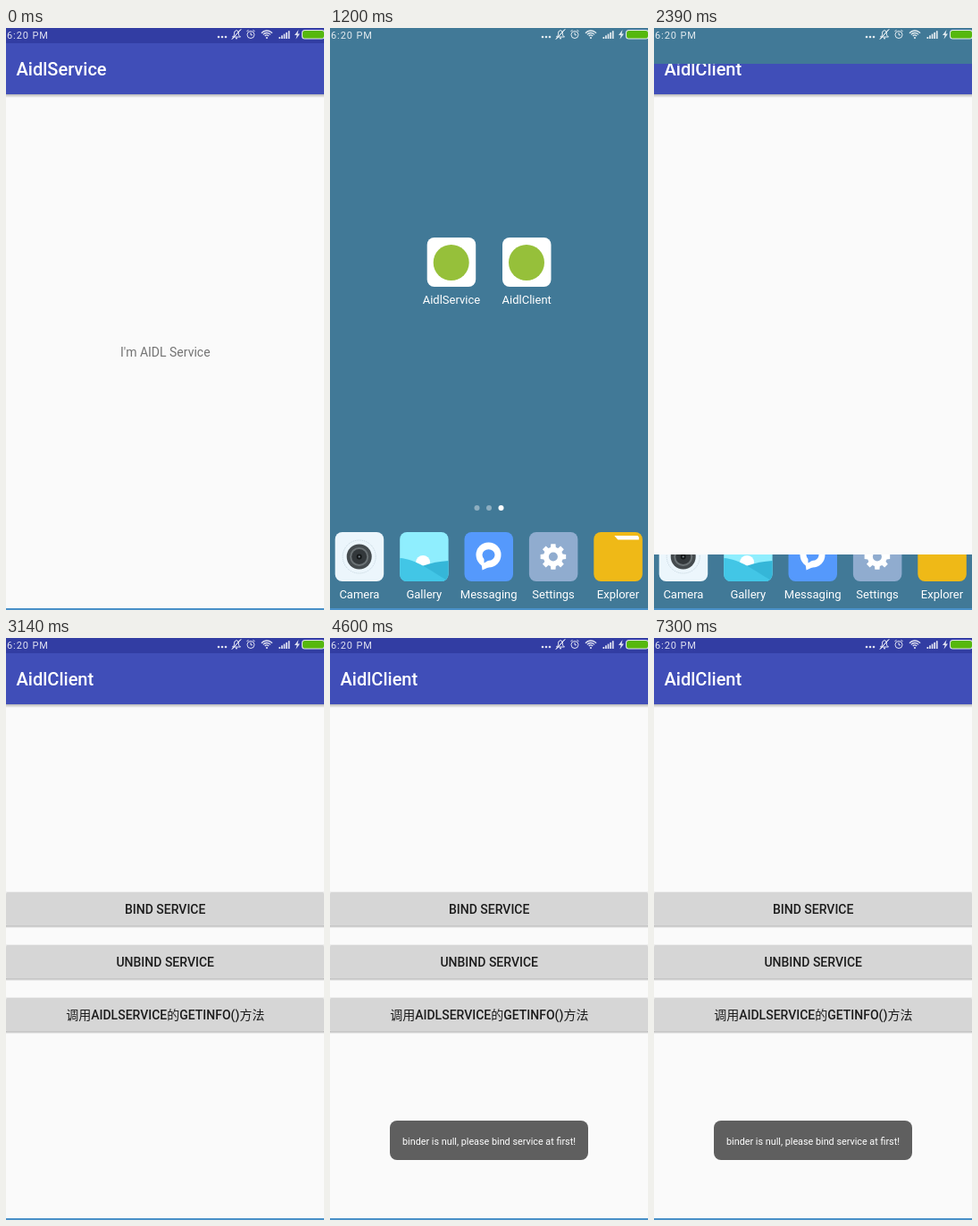
Animation, 356 px wide and 650 px high, one loop 8000 ms. Source, as an HTML page with a canvas:

```html
<!DOCTYPE html>
<html lang="en">
<head>
<meta charset="utf-8">
<title>AIDL demo</title>
<style>
html, body { margin: 0; width: 100%; height: 100%; overflow: hidden; background: #fafafa; }
canvas { display: block; width: 356px; height: 650px; }
</style>
</head>
<body>
<canvas id="stage" width="356" height="650"></canvas>
<script>
const W = 356, H = 650, LOOP = 8000;
const ctx = document.getElementById('stage').getContext('2d');
const COLOR = {
  wall: '#417997', statusBar: '#323da3', toolbar: '#404eb8',
  page: '#fafafa', button: '#d6d6d6', toast: '#5f5f5f', line: '#4990c8'
};

function rect(x, y, w, h, fill) {
  ctx.fillStyle = fill;
  ctx.fillRect(x, y, w, h);
}

function roundRect(x, y, w, h, r, fill) {
  ctx.fillStyle = fill;
  ctx.beginPath();
  ctx.roundRect(x, y, w, h, r);
  ctx.fill();
}

function circle(x, y, r, fill) {
  ctx.fillStyle = fill;
  ctx.beginPath();
  ctx.arc(x, y, r, 0, Math.PI * 2);
  ctx.fill();
}

function arc(x, y, r, from = 0, to = Math.PI * 2) {
  ctx.beginPath();
  ctx.arc(x, y, r, from, to);
  ctx.stroke();
}

function poly(points, fill) {
  ctx.beginPath();
  points.forEach(([x, y]) => ctx.lineTo(x, y));
  ctx.closePath();
  if (fill) {
    ctx.fillStyle = fill;
    ctx.fill();
  } else ctx.stroke();
}

function text(str, x, y, size, fill, { weight = 400, align = 'center', spacing = 0 } = {}) {
  ctx.font = `${weight} ${size}px Roboto, "Noto Sans CJK SC", sans-serif`;
  ctx.textAlign = align;
  ctx.letterSpacing = spacing + 'px';
  ctx.fillStyle = fill;
  ctx.fillText(str, x, y);
}

function fade(y, h, alpha) {
  const g = ctx.createLinearGradient(0, y, 0, y + h);
  g.addColorStop(0, `rgba(0,0,0,${alpha})`);
  g.addColorStop(1, 'rgba(0,0,0,0)');
  rect(0, y, W, h, g);
}

// Value of the latest [time, value] step reached.
function stepAt(steps, t) {
  let value = null;
  for (const [start, v] of steps) if (t >= start) value = v;
  return value;
}

function statusIcons() {
  const tint = 'rgba(255,255,255,0.85)';
  text('6:20 PM', 1, 11.5, 11, tint, { align: 'left', spacing: 0.9 });
  for (let i = 0; i < 3; i++) circle(238 + i * 4, 10, 1.3, tint);

  ctx.strokeStyle = tint;
  ctx.lineWidth = 1;
  poly([[253.5, 10], [255.5, 8], [255.8, 4], [258, 2.5], [260.2, 4], [260.5, 8], [262.5, 10]]);
  poly([[253, 12.5], [263, 1.5]]);
  circle(258, 11.5, 1, tint);

  arc(274, 7.5, 4);
  ctx.beginPath();
  ctx.moveTo(274, 5);
  ctx.lineTo(274, 7.8);
  ctx.lineTo(276, 7.8);
  ctx.moveTo(269.5, 4);
  ctx.lineTo(271.5, 2);
  ctx.moveTo(276.5, 2);
  ctx.lineTo(278.5, 4);
  ctx.stroke();

  ctx.lineWidth = 1.3;
  for (const r of [3, 5.5, 8]) arc(292, 11, r, -Math.PI * 0.77, -Math.PI * 0.23);
  circle(292, 11, 1.1, tint);

  for (let i = 0; i < 5; i++) rect(305.5 + i * 2.6, 10 - i * 1.7, 1.7, 2 + i * 1.7, tint);
  poly([[327.5, 2], [323, 8], [325.7, 8], [324.5, 12.5], [329, 6.5], [326.5, 6.5]], tint);

  roundRect(331, 2, 26, 10.5, 3.5, tint);
  roundRect(332, 3, 24, 8.5, 2.8, '#56b80d');
}

function tile(x, y, fill) {
  roundRect(x, y, 54.5, 55, 8, fill);
}

function appIcon(x, name, dimmed) {
  tile(x, 234, '#fff');
  circle(x + 27, 262, 20, '#96c03a');
  if (dimmed) tile(x, 234, 'rgba(0,0,0,0.45)');
  text(name, x + 27.2, 308, 13, '#fff');
}

function cameraIcon(x) {
  tile(x, 563, '#ecf6fc');
  ctx.strokeStyle = '#b9cbd5';
  ctx.lineWidth = 0.8;
  ctx.setLineDash([1, 1]);
  arc(x + 27, 590.5, 18.5);
  ctx.setLineDash([]);
  circle(x + 27, 590.5, 14, '#454b4e');
  circle(x + 27, 590.5, 10.5, '#6b7275');
  circle(x + 27, 590.5, 8.5, '#33383b');
  circle(x + 27, 590.5, 3, '#151819');
  circle(x + 27, 590.5, 1, '#849097');
}

function galleryIcon(x) {
  ctx.save();
  ctx.beginPath();
  ctx.roundRect(x, 563, 54.5, 55, 8);
  ctx.clip();
  rect(x, 563, 55, 55, '#8feefe');
  circle(x + 26, 597, 8, '#fff');
  const wave = (from, c1, c2, to, fill) => {
    ctx.fillStyle = fill;
    ctx.beginPath();
    ctx.moveTo(x, 618);
    ctx.lineTo(x, from);
    ctx.bezierCurveTo(x + 18, c1, x + 34, c2, x + 55, to);
    ctx.lineTo(x + 55, 618);
    ctx.fill();
  };
  wave(612, 603, 596, 595, '#35b6d8');
  wave(592, 593, 606, 618, '#42c6e6');
  ctx.restore();
}

function messagingIcon(x) {
  tile(x, 563, '#5599fc');
  circle(x + 27, 588.5, 14, '#fff');
  poly([[x + 19, 598], [x + 20, 605.5], [x + 32, 600]], '#fff');
  ctx.fillStyle = '#5599fc';
  ctx.beginPath();
  ctx.ellipse(x + 27, 588.5, 7, 6.3, 0, 0, Math.PI * 2);
  ctx.fill();
  poly([[x + 22, 592], [x + 22, 597.5], [x + 28, 594]], '#5599fc');
}

function settingsIcon(x) {
  tile(x, 563, '#90accf');
  const points = [];
  for (let i = 0; i < 8; i++) {
    for (const [shift, r] of [[-0.27, 11], [-0.18, 14.5], [0.18, 14.5], [0.27, 11]]) {
      const a = i * Math.PI / 4 + shift;
      points.push([x + 27 + r * Math.cos(a), 590.5 + r * Math.sin(a)]);
    }
  }
  poly(points, '#fff');
  circle(x + 27, 590.5, 5, '#90accf');
}

function explorerIcon(x) {
  tile(x, 563, '#efb917');
  poly([[x + 23, 567], [x + 49, 567], [x + 50.5, 568.5], [x + 50.5, 571.5], [x + 27, 571.5]], '#fff');
}

const DOCK = [
  ['Camera', cameraIcon], ['Gallery', galleryIcon], ['Messaging', messagingIcon],
  ['Settings', settingsIcon], ['Explorer', explorerIcon]
];

function home(pressed) {
  rect(0, 0, W, H, COLOR.wall);
  appIcon(108.7, 'AidlService', false);
  appIcon(193, 'AidlClient', pressed);
  [0.4, 0.4, 1].forEach((a, i) => circle(164.5 + i * 13.5, 536, 3, `rgba(255,255,255,${a})`));
  DOCK.forEach(([name, icon], i) => {
    const x = 5.7 + i * 72.4;
    icon(x);
    text(name, x + 27.2, 637, 13, '#fff');
  });
}

function page(title, barTop = 0, shift = 0) {
  rect(0, barTop, W, H - barTop, COLOR.page);
  rect(0, barTop, W, 17 + shift - barTop, COLOR.statusBar);
  rect(0, 17 + shift, W, 57, COLOR.toolbar);
  fade(74 + shift, 4, 0.27);
  text(title, 11.5, 53 + shift, 20, '#fff', { weight: 500, align: 'left' });
}

function servicePage(barTop, shift) {
  page('AidlService', barTop, shift);
  text("I'm AIDL Service", 178.3, 367 + shift, 14, '#737373');
}

function button(y, pressed) {
  fade(y + 37, pressed ? 7 : 3, pressed ? 0.4 : 0.32);
  rect(0, y - 0.5, W, 1, '#e4e4e4');
  roundRect(0, y, W, 37.5, 1.5, COLOR.button);
}

function mixedLabel(parts, center, y) {
  const weightOf = s => /[A-Z]/.test(s) ? 500 : 300;
  const widths = parts.map(s => {
    ctx.letterSpacing = '0px';
    ctx.font = `${weightOf(s)} 14px Roboto, "Noto Sans CJK SC", sans-serif`;
    return ctx.measureText(s).width;
  });
  let x = center - widths.reduce((a, b) => a + b) / 2;
  parts.forEach((s, i) => {
    text(s, x, y, 14, '#1c1c1c', { weight: weightOf(s), align: 'left' });
    x += widths[i];
  });
}

function clientPage(t) {
  page('AidlClient');
  if (t < 2690) return;
  button(284, false);
  button(343, t >= 4020 && t < 4170);
  button(402, t >= 3280 && t < 3430);
  mixedLabel(['BIND SERVICE'], 178.2, 307.5);
  mixedLabel(['UNBIND SERVICE'], 178.2, 366.5);
  mixedLabel(['调用', 'AIDLSERVICE', '的', 'GETINFO()', '方法'], 178.3, 425.5);
}

function toast(y, alpha) {
  ctx.globalAlpha = alpha;
  roundRect(67, y, 222, 44, 8, COLOR.toast);
  text('binder is null, please bind service at first!', 178, y + 26.5, 10.8, '#fff');
  ctx.globalAlpha = 1;
}

// Each toast rises past its rest position and settles: [time, [top, alpha]].
const TOASTS = [
  [[3430, [563, 0.25]], [3580, [532, 1]], [3730, [538, 1]], [3870, [539, 1]],
   [6850, [539, 0.77]], [7000, null]],
  [[6850, [566, 0.17]], [7000, [532, 1]], [7150, [538, 1]], [7300, [539, 1]]]
];

function draw(t) {
  if (t < 1050) servicePage(0, 0);
  else if (t < 2540) {
    home(t >= 2100);
    if (t < 1200) servicePage(68, 72);
    if (t >= 2390) {
      ctx.save();
      ctx.beginPath();
      ctx.rect(0, 40, W, 548);
      ctx.clip();
      clientPage(t);
      ctx.restore();
    }
  } else clientPage(t);

  for (const steps of [...TOASTS].reverse()) {
    const pose = stepAt(steps, t);
    if (pose) toast(...pose);
  }
  statusIcons();
  rect(0, 648, W, 2, COLOR.line);
}

const start = performance.now();
function tick() {
  draw((performance.now() - start) % LOOP);
  requestAnimationFrame(tick);
}
tick();
</script>
</body>
</html>
```
